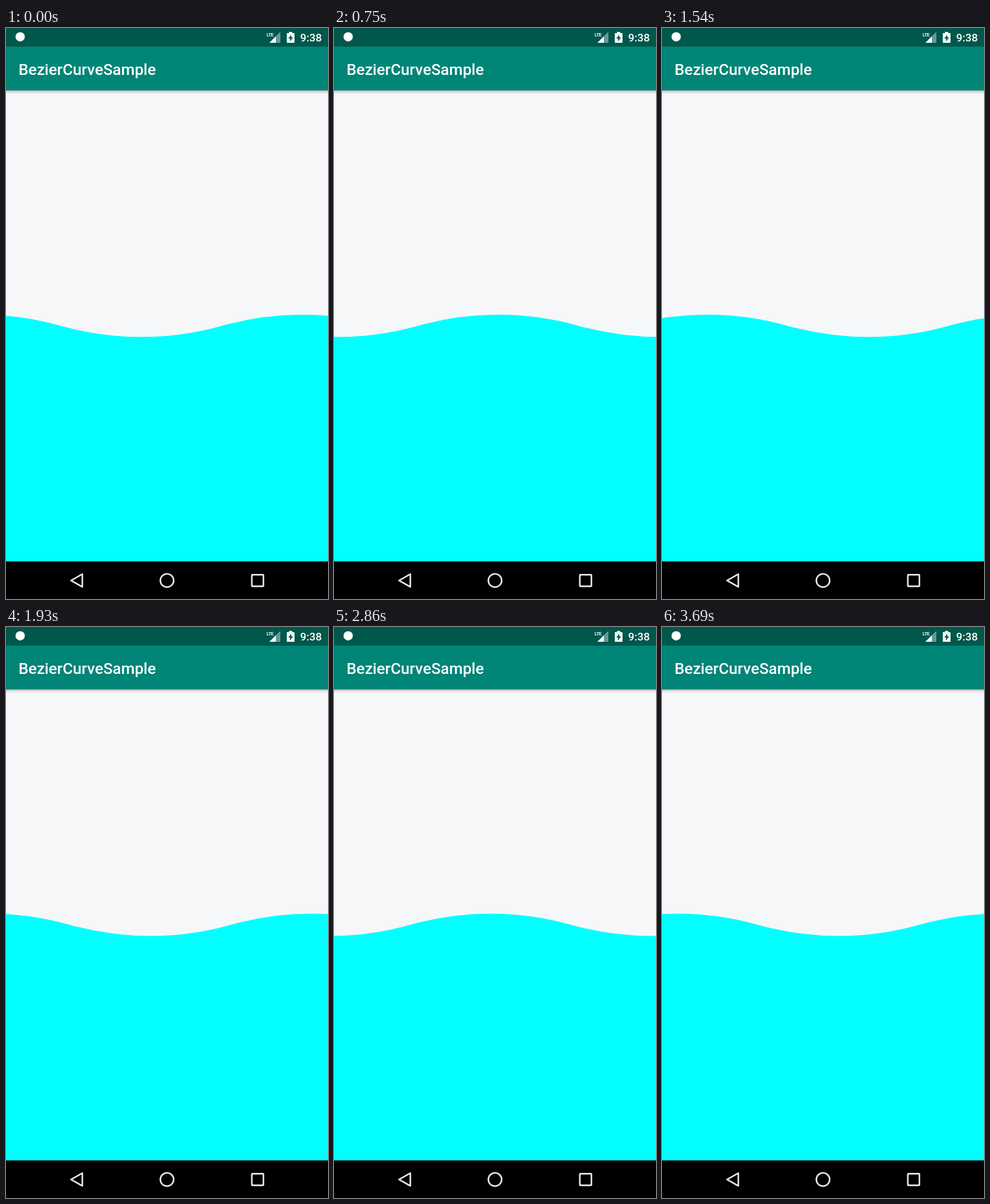
Animation, 500 px wide and 888 px high, one loop 3780 ms. Source, as an HTML page:

```html
<!DOCTYPE html>
<html lang="en">
<head>
<meta charset="utf-8">
<title>Wave</title>
<style>
  html, body { margin: 0; width: 100%; height: 100%; overflow: hidden; background: #f6f7f9; }
  svg { display: block; width: 500px; height: 888px; }
  text { font-family: Roboto, sans-serif; font-weight: 500; fill: #fff; }
  .title { font-size: 24.3px; }
  .clock { font-size: 17px; text-anchor: end; }
  .net { font-size: 8px; letter-spacing: -.8px; font-stretch: condensed; }
  .nav { fill: none; stroke: #ececec; stroke-width: 2.4; stroke-linejoin: round; }
  .wave { fill: #0ff; animation: flow 3780ms infinite; }

  /* The wave advances in short hops, as captured on the device */
  @keyframes flow {
    0%      { transform: translateX(0);      animation-timing-function: steps(15); }
    19.841% { transform: translateX(-205px); animation-timing-function: steps(10); }
    31.481% { transform: translateX(-298px); animation-timing-function: steps(7); }
    40.741% { transform: translateX(-390px); animation-timing-function: steps(12); }
    60.582% { transform: translateX(-582px); animation-timing-function: steps(10); }
    75.661% { transform: translateX(-717px); animation-timing-function: steps(14); }
    97.619%, 100% { transform: translateX(-936px); }
  }
</style>
</head>
<body>
<svg viewBox="0 0 500 888">
  <defs>
    <linearGradient id="shade" x2="0" y2="1">
      <stop offset="0" stop-color="#000" stop-opacity=".3"/>
      <stop offset=".4" stop-color="#000" stop-opacity=".1"/>
      <stop offset="1" stop-color="#000" stop-opacity="0"/>
    </linearGradient>
  </defs>

  <rect width="500" height="888" fill="#f6f7f9"/>
  <path class="wave" d="M-165 463.2q125 -34.7 250 0t250 0t250 0t250 0t250 0t250 0t250 0t250 0V830H-165Z"/>

  <!-- App bar -->
  <rect y="97" width="500" height="6" fill="url(#shade)"/>
  <rect y="28" width="500" height="69" fill="#008577"/>
  <text class="title" x="19.5" y="72.5">BezierCurveSample</text>

  <!-- Status bar -->
  <rect width="500" height="29" fill="#00574b"/>
  <circle cx="22" cy="13.7" r="7.2" fill="#fff"/>
  <text class="net" x="404.5" y="13">LTE</text>
  <path d="M409 23L426 6V23Z" fill="#fff" fill-opacity=".4"/>
  <path d="M409 23L419 13V23Z" fill="#fff"/>
  <path d="M439.5 6h5v2h3.5v15h-12v-15h3.5Z" fill="#fff"/>
  <path d="M443 10.5v4h2.8l-4.8 6.5v-4.7h-2.8Z" fill="#00574b"/>
  <text class="clock" x="490.3" y="21.3">9:38</text>

  <!-- Navigation bar -->
  <rect y="829.5" width="500" height="58.5" fill="#000"/>
  <g class="nav">
    <path d="M101 859.2L118.5 849.3V869.1Z"/>
    <circle cx="250" cy="859.2" r="10.3"/>
    <rect x="381.7" y="850.2" width="18" height="18" rx=".8"/>
  </g>
</svg>
</body>
</html>
```
